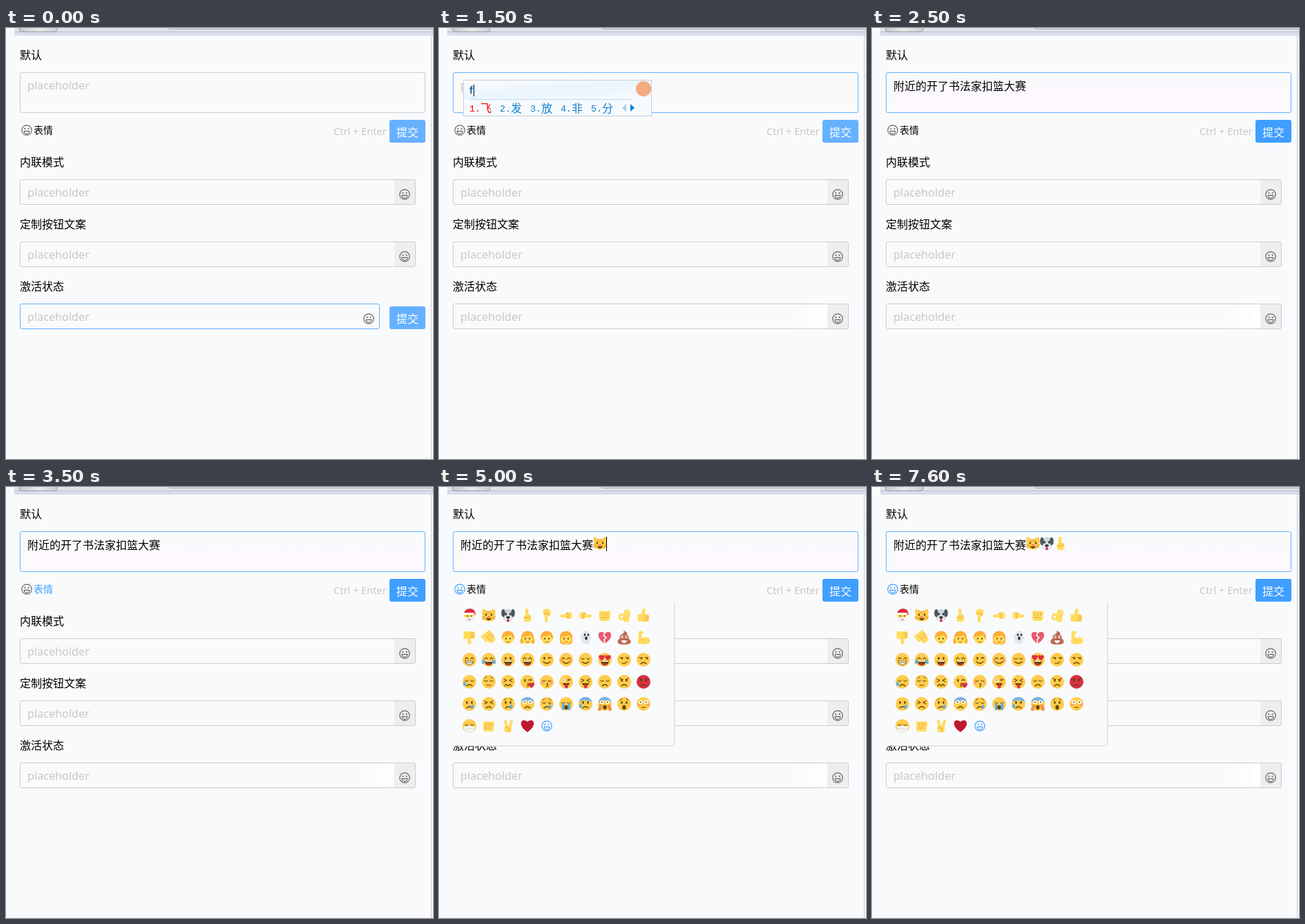
These frames come from a looping animation (618x624 px, 8 s). An HTML page:

```html
<!DOCTYPE html>
<html lang="zh">
<head>
<meta charset="utf-8">
<title>Reply box</title>
<style>
  html, body { margin: 0; width: 100%; height: 100%; overflow: hidden; background: #f9fafc; }
  svg { display: block; width: 618px; height: 624px; }
  text { font: 16px "Noto Sans CJK SC", "Noto Sans CJK", sans-serif; white-space: pre; }
  .hint { font: 16.2px "Noto Sans", "Open Sans", sans-serif; fill: #c8c8c8; }
  .keys { font: 14.6px "Noto Sans", "Open Sans", sans-serif; fill: #c8c8c8; }
  .small { font-size: 14px; }
  .white { fill: #fff; }
  .field { fill: none; stroke: #ccc; }
  .pinyin { font: bold 14.67px "Liberation Sans", Arial, sans-serif; fill: #0a62b4; }
  .pick { font-weight: 300; }
  .num { font: 13.33px "Liberation Mono", monospace; }
  .icon { fill: none; stroke: #666; color: #666; stroke-width: 1.2; }
  .icon.on { stroke: #409eff; color: #409eff; }
</style>
</head>
<body>
<svg viewBox="0 0 618 624">
  <defs>
    <linearGradient id="tab"><stop stop-color="#c5cbcd"/><stop offset=".5" stop-color="#e5eaeb"/><stop offset="1" stop-color="#ccd0d3"/></linearGradient>
    <linearGradient id="rose" x2="0" y2="1"><stop stop-color="#fdf8fe" stop-opacity="0"/><stop offset=".5" stop-color="#fef8ff"/></linearGradient>
    <linearGradient id="sky" x2="1" y2="1"><stop stop-color="#fafcfe"/><stop offset=".5" stop-color="#eaf5fd"/><stop offset="1" stop-color="#f7fafd"/></linearGradient>
    <g id="smile">
      <circle r="7.2"/>
      <path d="M-4 1.3H4A4 4 0 0 1-4 1.3Z"/>
      <circle cx="-2.6" cy="-2.2" r="1.1" fill="currentColor" stroke="none"/>
      <circle cx="2.6" cy="-2.2" r="1.1" fill="currentColor" stroke="none"/>
    </g>
  </defs>
  <rect width="618" height="624" fill="#f9fafc"/>

  <rect x="12" width="606" height="6" fill="#dfe3ec"/>
  <rect x="12" y="5" width="606" height="6" fill="#d9dcea"/>
  <path d="M12 5.5H618" stroke="#bcc1d0"/>
  <path d="M19.5 0V3Q20 5.5 23 5.5H70Q73.5 5.5 74 3V0" fill="url(#tab)" stroke="#999da1"/>
  <path d="M235.5 0Q236 1.5 238 1.5H618" fill="none" stroke="#a4a9b6"/>
  <path d="M615.5 11V624" stroke="#ccc"/>
  <path d="M616 40.5h2M616 69.5h2" stroke="#d5d7dc"/>

  <text x="20" y="45">默认</text>
  <text x="20" y="200">内联模式</text>
  <text x="20" y="290">定制按钮文案</text>
  <text x="20" y="380">激活状态</text>

  <rect id="tint" x="34" y="75" width="572" height="47" fill="url(#rose)"/>
  <rect id="area" class="field" x="20.5" y="64.5" width="586" height="58" rx="2.5"/>
  <text id="empty" class="hint" x="31" y="89">placeholder</text>
  <text id="typed" x="31" y="89.5">附近的开了书法家扣篮大赛</text>
  <use id="face" class="icon" href="#smile" x="30" y="148"/>
  <text id="faceLabel" class="small" x="40" y="153">表情</text>
  <text class="keys" x="474" y="155">Ctrl + Enter</text>
  <rect id="send" x="555" y="133" width="52" height="33" rx="3"/>
  <text class="white" x="565" y="156.5">提交</text>

  <g id="rows"></g>
  <g id="ghost">
    <rect x="515" y="401" width="20" height="34" fill="#fafbfd"/>
    <rect x="535" y="400" width="14" height="35" fill="#fcfdfe"/>
    <rect x="549" y="400" width="13" height="35" fill="#fff"/>
    <rect x="593" y="403" width="14" height="33" fill="#fafbfe"/>
  </g>
  <g id="submit">
    <rect x="555" y="403" width="52" height="33" rx="3" fill="#66b1ff"/>
    <text class="white" x="565" y="426.5">提交</text>
  </g>
  <rect id="addon" x="510" y="400" width="30" height="35" fill="#eee"/>
  <rect id="last" class="field" x="20.5" y="399.5" width="520" height="36" rx="2.5"/>
  <text class="hint" x="31" y="424">placeholder</text>
  <use id="lastFace" class="icon" href="#smile" y="421"/>

  <g id="panel">
    <rect x="21" y="164" width="320.5" height="211.5" rx="5" fill="#e6dce1"/>
    <rect x="20" y="163" width="320" height="211" rx="4" fill="#f9fafc"/>
  </g>
  <g id="inserted"></g>
  <rect id="caret" y="72" width="1" height="21"/>
  <g id="ime"></g>
</svg>
<script>
const $ = id => document.getElementById(id);
const dark = '#664500', skin = '#ffdc5d', shade = '#ef9645', gold = '#ffcc4d', blue = '#5dadec', red = '#dd2e44';

// Drawing helpers: every emoji lives in a 20 by 20 box around the origin.
const line = (d, c = dark, w = 1.2) =>
  `<path d="${d}" fill="none" stroke="${c}" stroke-width="${w}" stroke-linecap="round" stroke-linejoin="round"/>`;
const fill = (d, c = dark) => `<path d="${d}" fill="${c}"/>`;
const oval = (x, y, rx, ry = rx, c = dark) => `<ellipse cx="${x}" cy="${y}" rx="${rx}" ry="${ry}" fill="${c}"/>`;
const pair = (x, y, rx, ry = rx, c = dark) => oval(-x, y, rx, ry, c) + oval(x, y, rx, ry, c);
const box = (x, y, w, h, r, c = skin) => `<rect x="${x}" y="${y}" width="${w}" height="${h}" rx="${r}" fill="${c}"/>`;
const move = (t, s) => `<g transform="${t}">${s}</g>`;
const heart = c => fill('M0 9C-16-2-8-13 0-6 8-13 16-2 0 9Z', c);
const drop = (x, y) => move(`translate(${x} ${y})`, fill('M0-4Q4.5 3 0 3-4.5 3 0-4', blue));

const parts = {
  dots: pair(3.5, -2, 1.3, 1.9),
  arcs: line('M-6-1q2-4 4 0M2-1q2-4 4 0'),
  shut: line('M-6-2q2 3 4 0M2-2q2 3 4 0'),
  squint: line('M-6-4l4 2-4 2M6-4l-4 2 4 2'),
  wink: oval(-3.5, -2, 1.3, 1.9) + line('M2-2q2-2 4 0'),
  side: line('M-6.5-3h4.5M2-3h4.5') + pair(0, 0, 0) + oval(-3, -1.8, 1.2) + oval(5, -1.8, 1.2),
  hearts: [-4.5, 4.5].map(x => move(`translate(${x} -3) scale(.46)`, heart(red))).join(''),
  wide: pair(4, -2.5, 2.8, 2.8, '#fff') + pair(4, -2.5, 1.1),
  crazy: oval(-4, -2.5, 2.6, 2.6, '#fff') + oval(-4, -2.5, 1.1) + line('M2-4l4 1-4 2'),
  grin: fill('M-6 2H6Q5 7.5 0 7.5T-6 2', '#fff') + line('M-6 2H6Q5 7.5 0 7.5T-6 2ZM-5 4.4H5', dark, .8),
  open: fill('M-6 1.5H6Q5 8.5 0 8.5T-6 1.5') + oval(0, 6.8, 3, 1.4, red) + box(-5, 1.5, 10, 1.5, 0, '#fff'),
  smile: line('M-5 3q5 4.5 10 0'),
  smirk: line('M-3 5q5 1 7-2'),
  frown: line('M-4 6q4-4 8 0'),
  flat: line('M-3 5h6'),
  wavy: line('M-5 6l2.5-2.5L0 6l2.5-2.5L5 6'),
  kiss: line('M0 2q3 1 0 2.5 3 1 0 2.5'),
  oh: oval(0, 5, 2.6, 3.3),
  tongue: fill('M-5 2H5Q4 6 0 6T-5 2') + box(-2, 3, 4.5, 6.5, 2.2, red),
  wail: oval(0, 5, 3.5, 3),
  sadBrows: line('M-6-5.5q2-.3 3-2M6-5.5q-2-.3-3-2', dark, 1),
  angryBrows: line('M-6.5-5L-2-3.2M6.5-5L2-3.2'),
  blush: pair(6.5, 1.5, 2, 1.4, '#ff9380'),
  joyTears: drop(-8, 3) + drop(8, 3),
  tear: drop(4.5, 4),
  sweat: drop(-7, 3),
  streams: box(-6, -1, 3.5, 10, 1, blue) + box(2.5, -1, 3.5, 10, 1, blue),
  chill: fill('M-9.5-3A10 10 0 0 1 9.5-3Q0-7-9.5-3', '#78b6e8'),
  love: move('translate(6 5) scale(.45)', heart(red)),
  hands: move('rotate(20 -8 6)', box(-9.5, 0, 5, 10, 2.5, shade)) + move('rotate(-20 8 6)', box(4.5, 0, 5, 10, 2.5, shade)),
  mask: fill('M-8.5 1Q0-1.5 8.5 1L6 8Q0 11-6 8Z', '#f0f4f6') + line('M-5 4h10', '#ccd6dd', .8),
};
const face = (names, c = gold) => oval(0, 0, 10, 10, c) + names.split(' ').map(n => parts[n]).join('');

const point = box(-3, -10, 4.4, 14, 2.2) + box(-5.5, -1, 11, 10.5, 4.5) + line('M-4 3.5q3-2 5.5 0M3-.5v3', shade, 1);
const thumb = move('rotate(12)', box(-3.5, -10, 4.6, 13, 2.3)) + box(-8.5, -2, 5, 11, 2) +
  box(-5, -2, 13, 11, 3.5) + line('M2 1h5M2 4h5M2 6.8h4', shade, .9);
const knuckles = (y, h) => [0, 1, 2, 3].map(i => box(-8 + i * 4, y, 3.9, h, 1.9)).join('');
const fist = box(-8, -5, 15.5, 13, 4) + knuckles(-7, 8) + line('M-4-4v4M0-4v4M4-4v4M-6 3h9', shade, .9);
const person = (hair, back = '') => back + oval(0, 1, 8, 8.5, skin) + fill(hair, '#ffac33') +
  pair(3, 1.5, 1, 1.3) + line('M-2.5 6q2.5 1.5 5 0', '#c1694f', 1);
const cap = 'M-9 3Q-10-9 0-9.5 10-9 9 3 6-1 4-4 0-1-6-2Z';
const longHair = box(-9, -6, 18, 16, 5, '#ffac33');

const cat = fill('M-9-9.5Q-4-9-2-6H2Q4-9 9-9.5 10-4 9 0 11 8 0 8.5-11 8-9 0-10-4-9-9.5', gold) +
  line('M-2.5-6v2.5M0-6.5v3M2.5-6v2.5M-9.5 2l3 .5M9.5 2l-3 .5M-9 5l3-1M9 5l-3-1', '#f18f26', 1) +
  pair(4, -1, 1.2, 1.8) + fill('M-4 3Q0 5 4 3 3 7 0 7T-4 3') + oval(0, 2, 1.4, 1, '#e75a70');
const dog = oval(0, 0, 7.6, 9.5, '#ccd6dd') + pair(7, -3.5, 2.8, 5.8, '#4a555c') + pair(3.2, -2, 1.3, 1.8, '#292f33') +
  oval(0, 4.5, 5, 4.2, '#f0f3f5') + box(-1.8, 5, 3.6, 4.5, 1.8, red) + oval(0, 2.8, 2.8, 1.9, '#292f33');
const santa = oval(0, 1, 8, 8, skin) + fill('M-8 1Q-4 4 0 3T8 1Q9 10 0 10T-8 1', '#f0f3f5') +
  fill('M-8-3Q-6-10 1-10 9-10 9 0L7 1 6-3Z', red) + box(-8.5, -4, 16, 3, 1.5, '#fff') + oval(8, 1, 2, 2, '#fff') +
  pair(3, .8, 1) + line('M-1.5 6h3', red, 1);
const ghost = fill('M-6 8Q-4 3-6 0L-9-2Q-7-4-5-3-4-10 1-10T7-2L9 2 6 2Q7 8 2 10-1 7-6 8', '#dfe6ea') +
  oval(-1, -4, 1.3, 1.7, '#292f33') + oval(4, -4, 1.3, 1.7, '#292f33') + oval(1, 1, 1.8, 2.4, '#292f33');
const poop = fill('M-1-10Q6-8 4-4 8-3 6 1 11 4 9 8 7 10 0 10T-9 8Q-11 4-6 1-8-3-3-5 1-7-1-10', '#bf6952') +
  pair(3, -1, 1.7, 2, '#fff') + pair(3, -1, .8) + fill('M-4 4H4Q3 8 0 8T-4 4', '#fff');
const muscle = fill('M-7-9Q-1-11 0-7L-3-4-2 2Q3-3 8 1 12 7 6 9-2 11-8 8-7-2-7-9', skin) + line('M-2 2q-1 2 1 3', shade, 1);
const clap = move('rotate(-38)', box(-4, -3, 11, 12, 4) + knuckles(-9, 12)) + line('M-4-2l6 6M-1-5l6 6M3-6l4 5', shade, .9);
const okay = `<circle cx="-3.5" cy="2" r="3.6" fill="none" stroke="${skin}" stroke-width="3"/>` +
  box(-1, 0, 8, 9.5, 3.5) + move('rotate(12)', box(-1, -9, 3, 13, 1.5) + box(2.3, -10, 3, 13, 1.5) + box(5.5, -8, 2.6, 12, 1.3));
const victory = move('rotate(-14)', box(-4, -10, 3.8, 13, 1.9)) + move('rotate(16)', box(1, -10, 3.8, 13, 1.9)) +
  box(-5.5, -1, 10.5, 10.5, 4) + line('M-4 3q4-2 6 1M1 5v2', shade, 1);

const emojis = [
  santa, cat, dog, point, move('scale(1 -1)', point), move('rotate(-90) scale(.9)', point),
  move('rotate(90) scale(-.9 .9)', point), fist, okay, thumb,
  move('scale(1 -1)', thumb), clap, person(cap), person(cap, pair(8, 5, 2.4, 4, '#ffac33')), person(cap),
  person(cap, longHair), ghost, heart('#e75a70') + line('M0-7l-2 4 4 3-3 3 1 6', '#f9fafc', 1.6), poop, muscle,
  ...['arcs grin', 'arcs open joyTears', 'dots open', 'arcs open', 'wink smile', 'arcs smile blush', 'shut smile',
    'hearts open', 'side smirk', 'side frown',
    'shut frown sweat', 'shut flat sadBrows', 'squint wavy', 'wink kiss love', 'shut kiss blush', 'crazy tongue',
    'squint tongue', 'shut frown', 'dots frown angryBrows'].map(n => face(n)),
  face('dots frown angryBrows', '#da2f47'),
  ...['dots frown tear', 'squint frown', 'dots frown sadBrows tear', 'chill wide frown', 'shut frown sadBrows tear',
    'shut wail streams', 'chill dots frown sweat', 'chill wide oh hands', 'dots oh sadBrows', 'wide flat blush',
    'shut mask'].map(n => face(n)),
  fist, victory, heart('#be1931'),
];
const place = (x, y, s) => move(`translate(${x} ${y})`, s);
$('panel').innerHTML += emojis.map((e, i) => place(44 + i % 10 * 28, 186 + Math.floor(i / 10) * 32, e)).join('') +
  '<use class="icon on" href="#smile" x="156" y="346"/>';
$('inserted').innerHTML = emojis.slice(1, 4).map((e, i) => place(233 + i * 20, 82, e)).join('');

$('rows').innerHTML = [219, 309].map(y => `
  <rect x="562" y="${y + 1}" width="30" height="35" fill="#eee"/>
  <rect class="field" x="20.5" y="${y + .5}" width="572" height="36" rx="2.5"/>
  <text class="hint" x="31" y="${y + 25}">placeholder</text>
  <use class="icon" href="#smile" x="577" y="${y + 22}"/>`).join('');

const typing = [
  ['f', '飞 发 放 非 分'],
  ["f'j'd", '附近的 防静电 分阶段 非机动 附加'],
  ["f'j'd'k'l", '附近的开了 附近的 防静电 分阶段 非机动'],
  ["f'j'd'k'l's'f'j", '附近的开了书法家 附近的 防静电 分阶段 非机动'],
  ["f'j'd'k'l's'f'j'k'l'd's", '附近的开了书法家扣篮大赛 附近的 防静电 分阶段 非机动'],
];

function drawIme([letters, words]) {
  let x = 44;
  const picks = words.split(' ').map((word, i) => {
    const s = `<g fill="${i ? '#0a80d0' : '#f00'}"><text class="num" x="${x}" y="121">${i + 1}.</text>` +
      `<text class="pick" x="${x + 16}" y="121.5">${word}</text></g>`;
    x += 28 + word.length * 16;
    return s;
  }).join('');
  const right = x + 44;
  $('ime').innerHTML = `
    <rect x="35.5" y="75.5" width="${right - 36}" height="52" fill="#f7fafd" stroke="#c9cdd4"/>
    <rect x="36" y="76" width="${right - 37}" height="27" fill="url(#sky)"/>
    <path d="M44 103.5H${right - 28}" stroke="#b9dcf2"/>
    <circle cx="${right - 12}" cy="88" r="11" fill="#f5ab80"/>
    <text class="pinyin" x="44" y="95">${letters}</text>${picks}
    <path d="M${x + 7} 110v11l-6-5.5z" fill="#9fd0f0"/><path d="M${x + 13} 110v11l6-5.5z" fill="#0a80d0"/>`;
  const end = 45 + Math.ceil($('ime').querySelector('.pinyin').getComputedTextLength());
  $('ime').innerHTML += `<rect x="${end}" y="82" width="1" height="17"/>`;
}

// [x, from, to] for each time the caret is lit
const carets = [[31, 800, 1300], [31, 1600, 2000], [223, 2000, 2500], [223, 3000, 3500], [223, 3800, 4300],
  [223, 4700, 4900], [242, 5000, 5400], [262, 5500, 6000], [282, 6100, 6600], [282, 7100, 7600]];
const insertTimes = [4900, 5400, 6000];

const show = (el, on) => { el.style.display = on ? '' : 'none'; };
const mix = (a, b, p) => `color-mix(in srgb, ${a}, ${b} ${p * 100}%)`;

function draw(t) {
  const within = (a, b) => t >= a && t < b;
  const p = t < 800 ? 0 : Math.min(1, .1 + (t - 800) / 300 * .9);
  $('last').setAttribute('width', 520 + 52 * p);
  $('last').style.stroke = mix('#66b1ff', '#cccccc', p);
  $('lastFace').setAttribute('x', 525 + 52 * p);
  $('addon').setAttribute('x', 510 + 52 * p);
  $('addon').style.opacity = p;
  $('submit').style.opacity = 1 - p;
  show($('ghost'), p === 1);

  $('area').style.stroke = mix('#cccccc', '#66b1ff', p);
  $('send').style.fill = mix('#66b1ff', '#409eff', t < 2000 ? 0 : t < 2100 ? .5 : 1);
  show($('empty'), t < 1600);
  show($('typed'), t >= 2000);
  show($('tint'), t >= 2000);

  const typingNow = within(1500, 2000);
  show($('ime'), typingNow);
  if (typingNow) drawIme(typing[Math.floor((t - 1500) / 100)]);

  show($('panel'), t >= 3800);
  $('face').classList.toggle('on', t >= 3800);
  $('faceLabel').style.fill = within(3400, 4100) ? '#409eff' : '#000';
  insertTimes.forEach((at, i) => show($('inserted').children[i], t >= at));

  const caret = carets.find(([, a, b]) => within(a, b));
  show($('caret'), caret);
  if (caret) $('caret').setAttribute('x', caret[0]);
}

let shown = -1;
function tick() {
  const t = Math.floor(performance.now() % 8000 / 100) * 100;
  if (t !== shown) draw(shown = t);
  requestAnimationFrame(tick);
}
tick();
</script>
</body>
</html>
```
